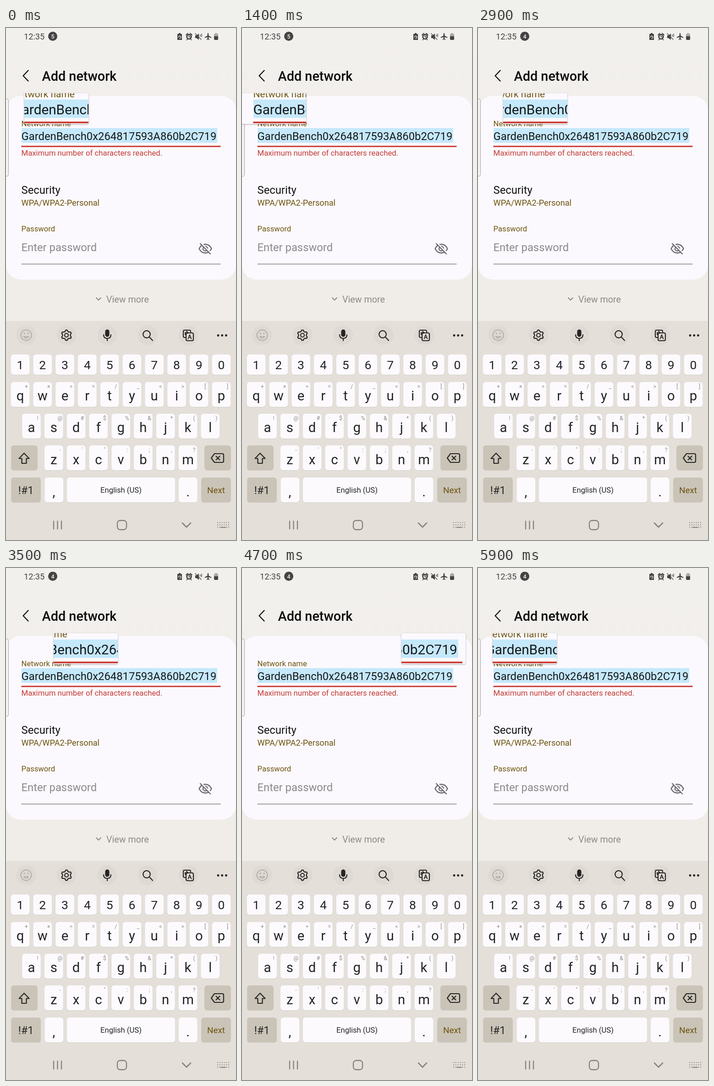
Animation of 502 by 1115 pixels, one loop 6000 ms. Source, as an HTML page:

```html
<!DOCTYPE html>
<html lang="en">
<head>
<meta charset="utf-8">
<title>Add network</title>
<style>
  html, body { margin: 0; width: 100%; height: 100%; overflow: hidden; background: #f1eeea; }
  svg { display: block; width: 502px; height: 1115px; font-family: Roboto, sans-serif; }
  .line { fill: none; stroke-linecap: round; stroke-linejoin: round; }
  .key { filter: drop-shadow(0 1px 0.5px #0001); }
  .mid { text-anchor: middle; }
  .hint { font-size: 12px; fill: #8a8887; text-anchor: middle; }
  .label { font-size: 16.7px; fill: #6d5410; }
  .big { font-size: 23.8px; }
</style>
</head>
<body>
<svg viewBox="0 0 502 1115">
  <defs>
    <linearGradient id="page" x2="0" y2="1">
      <stop stop-color="#f2f0ed"/><stop offset="1" stop-color="#f0ece7"/>
    </linearGradient>
    <clipPath id="lens"><rect y="142" width="140" height="67" rx="3"/></clipPath>
  </defs>
  <rect width="502" height="638" fill="url(#page)"/>
  <rect y="148" width="502" height="400" rx="32" fill="#fbf9fd"/>
  <rect x="-8" y="154.500" width="13.500" height="168.500" rx="4" fill="#f4f2f2" stroke="#a5a3a3"/>

  <!-- status bar -->
  <g fill="#444">
    <text x="39" y="24.500" font-size="18.200">12:35</text>
    <circle cx="102" cy="18" r="10"/>
    <text id="badge" class="mid" x="102" y="22.500" font-size="12.500" font-weight="500" fill="#f2f0ed"></text>
    <path d="M377 11h4v2h3v13h-10V13h3z"/>
    <path d="M376.500 20a2.600 2.600 0 1 1 2.500 2.500" class="line" stroke="#f2f0ed" stroke-width="1.300"/>
    <circle cx="399.500" cy="19" r="4.800" fill="none" stroke="#444" stroke-width="2.800"/>
    <path d="M393 15l4-3.500M406 15l-4-3.500M399.500 16v3.500h2.500M396 24l-1.500 2M403 24l1.500 2" class="line" stroke="#444" stroke-width="1.700"/>
    <path d="M413 16h3l5-4v14l-5-4h-3z"/>
    <path d="M413 12l13 13M424 15v3M427 13v6" class="line" stroke="#444" stroke-width="1.400"/>
    <path d="M441 11q1.300 0 1.300 2v3.500l6 3.500v1.800l-6-2v3.700l2 1.500v1l-3.300-1-3.300 1v-1l2-1.500v-3.700l-6 2V20l6-3.500V13q0-2 1.300-2z"/>
    <path d="M456.500 11h4v2h2.500v5h-9v-5h2.500z" fill="#aaa8a6"/>
    <path d="M454 18h9v6q0 2-2 2h-5q-2 0-2-2z"/>
  </g>

  <path d="M48.500 92.500L37.500 104l11 11.500" class="line" stroke="#111" stroke-width="2.300"/>
  <text x="78.500" y="114.500" font-size="28.800" font-weight="500" fill="#0c0c0c">Add network</text>

  <!-- form -->
  <g id="field">
    <text class="label" x="33.500" y="214">Network name</text>
    <rect x="34" y="218" width="427" height="32" fill="#c5e8fb"/>
    <text class="big" x="33.500" y="243.500" fill="#16181a">GardenBench0x264817593A860b2C719</text>
    <rect x="33.500" y="256.500" width="435" height="2.800" fill="#c7332b"/>
  </g>
  <text class="label" x="33.500" y="278" style="font-size:16.800px;fill:#c23a32">Maximum number of characters reached.</text>
  <text class="big" x="33.500" y="360.500" fill="#111">Security</text>
  <text class="label" x="33.500" y="386.500" style="font-size:18.200px">WPA/WPA2-Personal</text>
  <text class="label" x="33.500" y="443">Password</text>
  <text class="big" x="33.500" y="486" fill="#8b898b">Enter password</text>
  <rect x="33.500" y="513.300" width="435" height="1.500" fill="#858387"/>
  <g class="line" stroke="#67656a" stroke-width="2.300">
    <path d="M421.500 480.500q4.500-9.500 13.500-9.500t13.500 9.500q-4.500 9.500-13.500 9.500t-13.500-9.500z"/>
    <circle cx="435" cy="480.500" r="5"/>
    <path d="M426 468.500l22 22" stroke="#fbf9fd" stroke-width="3"/>
    <path d="M424 469.500l22 22.500"/>
  </g>
  <path d="M197 587.500l5 5 5-5" class="line" stroke="#858380" stroke-width="1.800"/>
  <text x="219" y="597.500" font-size="19.700" fill="#8c8987">View more</text>

  <!-- magnifier -->
  <g id="magnifier">
    <rect y="142" width="140" height="67" rx="3" fill="#fbf9fd" style="filter:drop-shadow(0 1px 1.500px #0005)"/>
    <g clip-path="url(#lens)"><use id="zoomed" href="#field"/></g>
  </g>

  <!-- keyboard -->
  <rect y="638" width="502" height="477" fill="#e4dfd9"/>
  <g id="tools" fill="#dfd9d3"></g>
  <g class="line" stroke="#b4afa9" stroke-width="2">
    <circle cx="44" cy="669" r="11.500"/>
    <path d="M38.500 672q5.500 7 11 0z"/>
    <path d="M40 665v.5M48 665v.5" stroke-width="3"/>
  </g>
  <g class="line" stroke="#262523" stroke-width="2.200">
    <path id="gear"/>
    <circle cx="132" cy="669" r="4"/>
    <rect x="217.500" y="657.500" width="7" height="14" rx="3.500" fill="#262523"/>
    <path d="M213 668q0 8 8 8t8-8M221 676v5"/>
    <circle cx="307" cy="667" r="7.800"/>
    <path d="M313 673l7 7.500"/>
    <path d="M392 674h-2q-3 0-3-3v-10q0-3 3-3h10q3 0 3 3v1"/>
    <rect x="393" y="664" width="16" height="17" rx="3"/>
    <path d="M397.500 677l3.500-9 3.500 9M399 674h4M391 668v-5h5M394 660l3 3-3 3" stroke-width="1.700"/>
    <path d="M463 669.500h.1M471.700 669.500h.1M480.400 669.500h.1" stroke-width="4.800"/>
  </g>
  <g id="keys" fill="#232323"></g>
  <g class="line" stroke="#262523" stroke-width="2.200">
    <path d="M39.500 926l11 11.500h-6V948h-10v-10.500h-6z"/>
    <path d="M455 927h17q3 0 3 3v13q0 3-3 3h-17l-7-9.500zM458.500 932.500l8 8M466.500 932.500l-8 8"/>
  </g>

  <!-- navigation -->
  <g class="line" stroke="#87827d" stroke-width="2.300">
    <path d="M104 1074v17M112.500 1074v17M121 1074v17"/>
    <rect x="243" y="1072.500" width="20" height="20" rx="6"/>
    <path d="M385 1078l9 9 9-9" stroke-width="2.600"/>
    <path d="M462 1077h24M462 1082h24M462 1087h24" stroke-width="2.200" stroke-dasharray="0.100 4.700"/>
    <path d="M469 1087.500h10" stroke-width="2"/>
  </g>
</svg>
<script>
const $ = id => document.getElementById(id);
const escapeText = s => s.replace(/&/g, '&amp;').replace(/</g, '&lt;');
const PITCH = 48.78;

const label = (x, y, size, text, fill = '#232323') =>
  `<text class="mid" x="${x}" y="${y}" font-size="${size}" fill="${fill}">${escapeText(text)}</text>`;
const key = (x, y, w, h = 54, fill = '#fcfafd') =>
  `<rect class="key" x="${x}" y="${y}" width="${w}" height="${h}" rx="6" fill="${fill}"/>`;

function keyRow(chars, firstX, y, h, size, baseline, hints = '') {
  return [...chars].map((char, i) => {
    const x = firstX + i * PITCH;
    const hint = hints[i] ? `<text class="hint" x="${x + 13.5}" y="${y + 14}">${escapeText(hints[i])}</text>` : '';
    return key(x - 20.3, y, 40.6, h) + label(x, baseline, size, char) + hint;
  }).join('');
}

const DARK = '#cac4b8', LETTER = 29.3;
$('keys').innerHTML =
  keyRow('1234567890', 31, 711, 44, 26.5, 743) +
  keyRow('qwertyuiop', 31, 771, 54, LETTER, 810.5, '+×÷=/_<>[]') +
  keyRow('asdfghjkl', 55.5, 840, 54, LETTER, 880, '!@#$%&*()') +
  keyRow('zxcvbnm', 104.3, 909, 54, LETTER, 949.5, '-\'":;,?') +
  key(11, 909, 58, 54, DARK) + key(433, 909, 58, 54, DARK) +
  key(11, 979, 65, 54, DARK) + label(43.5, 1015, 23.5, '!#1') +
  key(84.5, 979, 40.5) + label(104.5, 1020, LETTER, ',') +
  key(133, 979, 236) + label(251, 1012, 16.6, 'English (US)') +
  key(377, 979, 40.5) + label(397, 1020, LETTER, '.') +
  key(426, 979, 65, 54, DARK) + label(458.5, 1013, 18.9, 'Next', '#6d5410');

$('tools').innerHTML = [44, 132, 221, 309, 398].map(x => `<circle cx="${x}" cy="669" r="21.5"/>`).join('');

// Six-toothed cog: two outer and two inner corners per tooth.
$('gear').setAttribute('d', 'M' + Array.from({ length: 24 }, (_, i) => {
  const angle = (i - 0.5) * Math.PI / 12, r = i % 4 < 2 ? 11.3 : 8.6;
  return [132 + r * Math.sin(angle), 669 - r * Math.cos(angle)].map(v => v.toFixed(1));
}).join('L') + 'z');

// Magnifier's left edge over time: [ms, px]
const DRAG = [[0, 40], [100, 35], [800, 95], [1400, 0], [1900, 0], [2300, 13], [2600, 35], [3300, 81],
  [3500, 104], [4200, 244], [4700, 348], [5200, 144], [5400, 43], [5900, 32], [6000, 32]];
const ZOOM = 1.25;

function dragAt(t) {
  const i = DRAG.findIndex(([time]) => time > t);
  const [t0, x0] = DRAG[i - 1], [t1, x1] = DRAG[i];
  return Math.round(x0 + (x1 - x0) * (t - t0) / (t1 - t0));
}

function draw(now) {
  const t = Math.floor(now % 6000 / 100) * 100;
  const left = dragAt(t);
  $('badge').textContent = t < 2000 ? 5 : 4;
  $('magnifier').setAttribute('transform', `translate(${left})`);
  $('zoomed').setAttribute('transform',
    `translate(${70 - ZOOM * (left + 70)} ${177 - ZOOM * 235}) scale(${ZOOM})`);
}

const start = performance.now();
function tick() {
  draw(performance.now() - start);
  requestAnimationFrame(tick);
}
tick();
</script>
</body>
</html>
```
